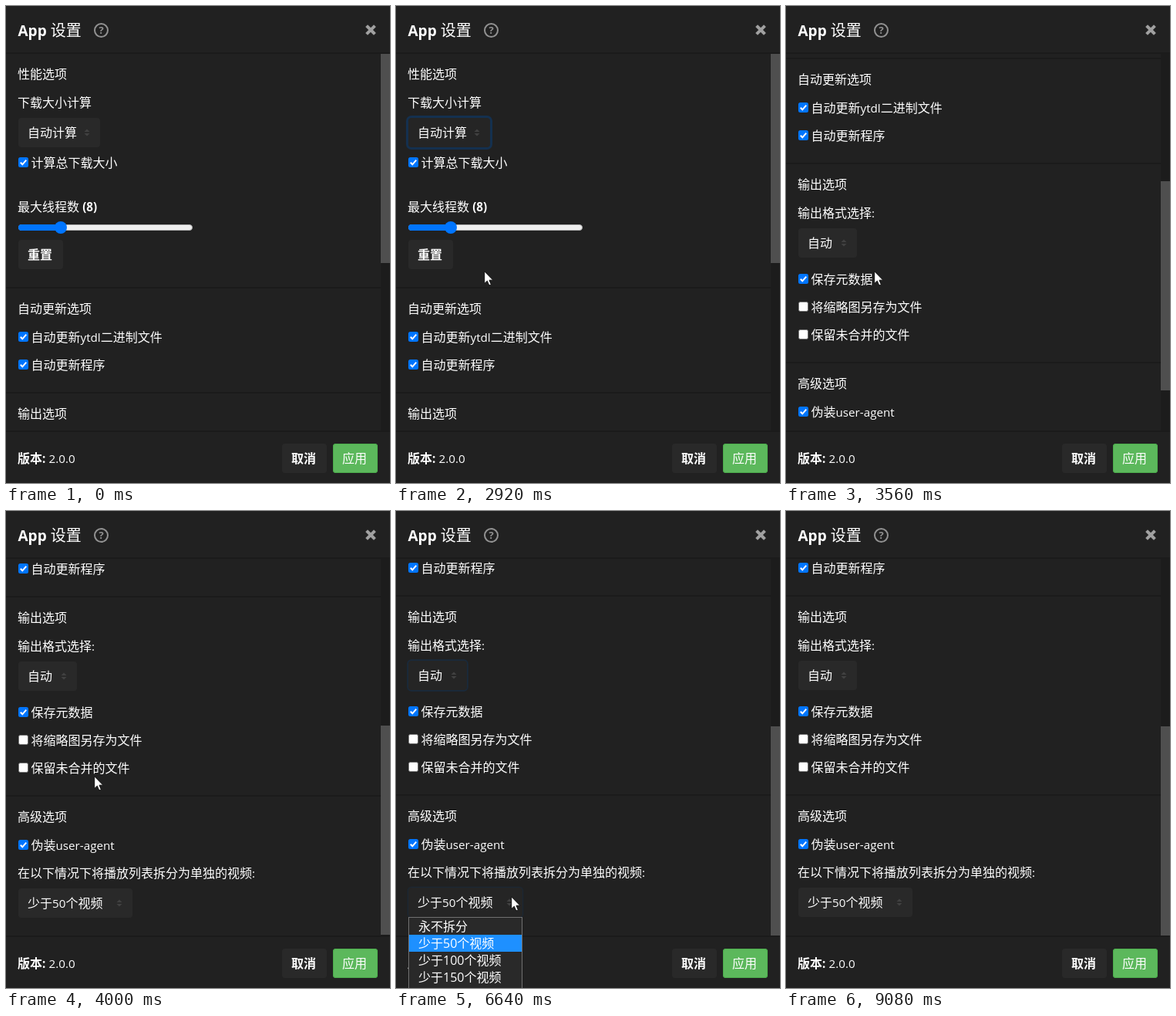
Recreate the animation shown at these times as an HTML page. Size 498 by 618 pixels, loop 9200 ms.

```html
<!DOCTYPE html>
<html lang="zh-CN">
<head>
<meta charset="utf-8">
<title>App 设置</title>
<style>
html, body { margin: 0; width: 100%; height: 100%; overflow: hidden; background: #212121; }
body { position: relative; color: #fff; font: 500 16px/24px "Open Sans", "Noto Sans CJK SC", "Noto Sans CJK", sans-serif; white-space: pre; }
div, svg { position: absolute; box-sizing: border-box; }
i { font-style: normal; font-size: .95em; }
#pane { left: 0; top: 62px; width: 498px; height: 488px; overflow: hidden; }
#page { left: 0; top: -62px; width: 486px; height: 941px; }
.line { left: 0; width: 498px; height: 2px; background: #1b1b1b; }
.btn { height: 38px; border-radius: 4px; background: #292929; line-height: 38px; padding-left: 12px; }
.bold { font-weight: 700; }
.apply { background: #5cb85c; box-shadow: inset 0 0 0 1px #4cae4c; }
.hover { filter: brightness(1.1); }
.box { left: 16px; width: 13px; height: 13px; border-radius: 2.5px; background: #fff; border: 1px solid #767676; }
.box.on { background: #0075ff; border: 0; }
.bar { left: 16px; top: 283px; height: 8px; border-radius: 4px; background: #0075ff; }
.arrows { fill: #414141; right: 13px; top: 14px; }
.list { left: 16px; border: 1px solid #707070; background: #292929; }
.list div { position: static; height: 22px; line-height: 22px; padding-left: 12px; }
.list .hot { background: #1e90ff; }
.list i { font-size: 1em; }
#track { top: 0; left: 486px; width: 12px; height: 488px; background: #1c1c1c; }
#thumb { width: 12px; height: 271px; background: #4f4f4f; }
#help { left: 114px; top: 22px; width: 19px; height: 19px; border: 2px solid #919191; border-radius: 50%; color: #919191; font: 700 13px/15px "Open Sans", sans-serif; text-align: center; }
</style>
</head>
<body>
<div id="pane"><div id="page"></div><div id="track"><div id="thumb"></div></div></div>
<div id="help">?</div>
<svg style="left:465px;top:23px" width="16" height="16"><path d="M4 4 12 12M12 4 4 12" stroke="#a0a0a0" stroke-width="4" stroke-linecap="square"/></svg>
<script>
const body = document.body, page = document.getElementById('page'), thumb = document.getElementById('thumb');

function add(parent, cls, css, html = '') {
  const el = document.createElement('div');
  el.className = cls;
  el.style.cssText = css;
  el.innerHTML = html;
  parent.append(el);
  return el;
}
// Latin runs are set slightly smaller than the Chinese text
const latin = s => s.replace(/[!-~]+/g, '<i>$&</i>');
const text = (y, s, x = 15, parent = page) => add(parent, '', `left:${x}px;top:${y - 12}px`, latin(s));
const line = (y, parent = page) => add(parent, 'line', `top:${y - 1}px`);
const button = (x, y, w, s, cls = 'bold', parent = page) =>
  add(parent, 'btn ' + cls, `left:${x}px;top:${y}px;width:${w}px`, latin(s));

function check(y, s, on = true) {
  add(page, on ? 'box on' : 'box', `top:${y - 7}px`, on
    ? '<svg width="13" height="13"><path d="M2.8 6.8 5.3 9.3 10.3 3.7" fill="none" stroke="#fff" stroke-width="2"/></svg>' : '');
  text(y, s, 32.5);
}
// A select with its popup; it opens, closes and loses focus at the given times
function select(y, w, scrolled, items, chosen, open, close, blur) {
  const el = button(16, y, w, items[chosen], '');
  el.insertAdjacentHTML('beforeend', '<svg class="arrows" width="8" height="10"><path d="M0.5 4 4 0.5 7.5 4ZM0.5 6 4 9.5 7.5 6Z"/></svg>');
  const top = y + 38 - scrolled;
  const list = add(body, 'list', `top:${top}px;width:${w}px`, items.map(s => `<div>${latin(s)}</div>`).join(''));
  return { el, list, top, w, chosen, open, close, blur };
}

const title = text(31.5, '', 15.5, body);
title.style.fontSize = '20px';
title.innerHTML = '<b><i>App</i></b> 设置';
line(61, body);
line(551, body);
text(586, '', 15, body).innerHTML = '<b>' + latin('版本:') + '</b> ' + latin('2.0.0');
const footer = [button(358, 567, 58, '取消', 'bold', body), button(424, 567, 58, '应用', 'apply', body)];

const SCROLL = 391;

text(88, '性能选项');
text(125, '下载大小计算');
const size = select(145, 106, 0, ['自动计算', '手动计算'], 0, 1245, 2320, 4800);
check(203, '计算总下载大小');
text(259.5, '最大线程数 ').innerHTML += '<b>' + latin('(8)') + '</b>';
add(page, 'bar', 'width:226px;background:#efefef;border:1px solid #b2b2b2');
add(page, 'bar', 'width:55px');
add(page, '', 'left:63px;top:279px;width:16px;height:16px;border-radius:8px;background:#0075ff');
button(16, 303, 58, '重置');
line(365);
text(392, '自动更新选项');
check(429, '自动更新ytdl二进制文件');
check(465, '自动更新程序');
line(501);
text(528, '输出选项');
text(565, '输出格式选择:');
const format = select(585, 76, SCROLL, ['自动', 'MP4', 'MKV'], 0, 4800, 5880, 6590);
check(651, '保存元数据');
check(687, '将缩略图另存为文件', false);
check(723, '保留未合并的文件', false);
line(759);
text(786, '高级选项');
check(823, '伪装user-agent');
text(859, '在以下情况下将播放列表拆分为单独的视频:');
const counts = [50, 100, 150, 200].map(n => `少于${n}个视频`);
const split = select(879, 148, SCROLL, ['永不拆分', ...counts], 1, 6590, 8950, 8950);
const selects = [size, format, split];

const cursor = add(body, '', 'left:0;top:0',
  '<svg width="14" height="22"><path d="M.7.8V16.6L4.3 13.2 6.8 19 9.4 17.9 7 12.2H11.8Z" fill="#fff" stroke="#111"/></svg>');

const LOOP = 9200, ENTER = 280, LEAVE = 8500;
// Pointer moves: each eases from wherever the last one ended
const moves = [
  { from: 280, to: 1240, x: 102, y: 150 },
  { from: 1700, to: 2320, x: 229, y: 260 },
  { from: 2320, to: 2920, x: 114, y: 343 },
  { from: 4350, to: 4920, x: 75, y: 212 },
  { from: 5300, to: 5880, x: 285, y: 275 },
  { from: 5880, to: 6480, x: 149, y: 499 },
  { from: 6640, to: 7280, x: 160, y: 588 },
  { from: 7480, to: 7720, x: 204, y: 546 },
  { from: 7720, to: 8480, x: 455, y: 600 },
];

const clamp = p => Math.max(0, Math.min(1, p));
const smooth = p => p * p * (3 - 2 * p);
const within = (v, a, b) => v >= a && v < b;

// The screen refreshes at a steady rate, shown on 40 ms ticks
function snap(t) {
  const TICK = 40, FIRST = 278, PERIOD = 154.42;
  const n = Math.floor((Math.floor(t / TICK) * TICK - FIRST) / PERIOD);
  return Math.ceil((FIRST + n * PERIOD) / TICK) * TICK;
}
function pointer(t) {
  let x = 404, y = 587;
  for (const m of moves) {
    const k = smooth(clamp((t - m.from) / (m.to - m.from)));
    x += (m.x - x) * k;
    y += (m.y - y) * k;
  }
  return [Math.round(x), Math.round(y)];
}
function drawSelect(s, t, x, y) {
  const FADE = 120;
  const p = clamp((t - s.open) / FADE) - clamp((t - s.blur) / FADE);
  s.el.style.boxShadow = `0 0 0 ${3 * p}px rgba(20,48,79,${p})`;
  s.el.style.background = p > .2 ? '#252525' : '#292929';
  s.list.style.display = within(t, s.open, s.close) ? 'block' : 'none';
  const rows = [...s.list.children];
  const row = Math.floor((y - s.top - 1) / 22);
  const hot = within(x, 16, 16 + s.w) && rows[row] ? row : s.chosen;
  rows.forEach((r, i) => r.className = i === hot ? 'hot' : '');
}
function draw(now) {
  const t = snap(now % LOOP);
  const [x, y] = pointer(t);
  const moving = within(t, ENTER, LEAVE);

  const top = SCROLL * Math.sin(Math.PI / 2 * clamp((t - 2960) / 1092));
  page.style.top = -62 - Math.round(top) + 'px';
  thumb.style.top = top * 217 / SCROLL + 'px';

  for (const s of selects) drawSelect(s, t, x, y);
  for (const b of footer) {
    const over = within(x, b.offsetLeft, b.offsetLeft + 58) && within(y, 567, 605);
    b.classList.toggle('hover', moving && over);
  }
  cursor.style.display = moving ? 'block' : 'none';
  cursor.style.transform = `translate(${x}px,${y}px)`;
}
let began;
function loop(now) {
  began ??= now;
  draw(now - began);
  requestAnimationFrame(loop);
}
requestAnimationFrame(loop);
</script>
</body>
</html>
```
